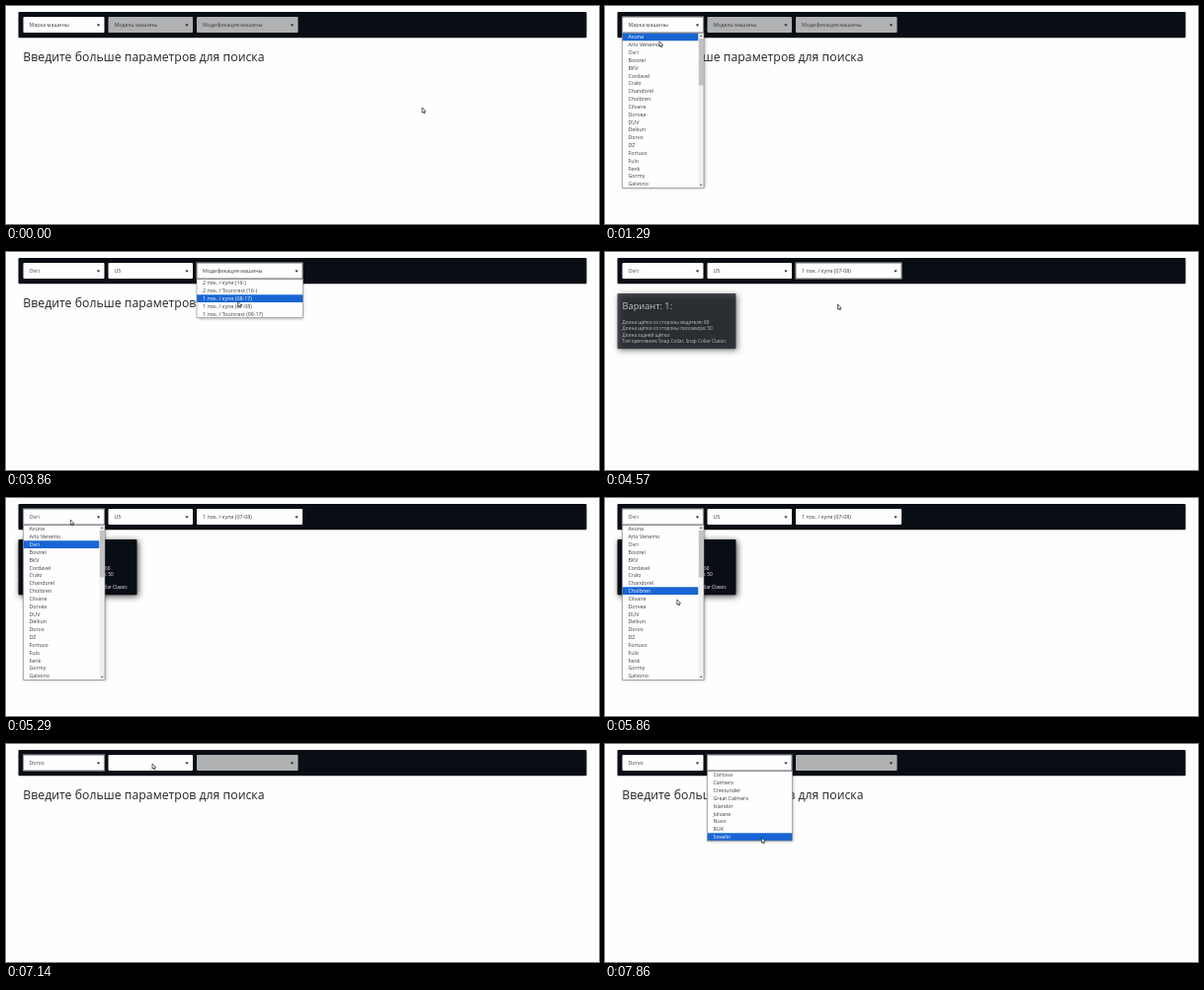
An HTML page with a canvas for the animation above (8 s loop, 600 px wide and 221 px high).

```html
<!DOCTYPE html>
<html lang="ru">
<head>
<meta charset="utf-8">
<title>Подбор щёток</title>
<style>
html, body { margin: 0; width: 100%; height: 100%; overflow: hidden; background: #fefefe; }
canvas { display: block; width: 600px; height: 221px; }
</style>
</head>
<body>
<canvas id="stage"></canvas>
<script>
const W = 600, H = 221, LOOP = 8000, FPS = 7;
const TOP = 27.5, ROW = 7.84, LAG = 45;
const DARK = '#090d14', INK = '#3a3b3e';

const canvas = document.getElementById('stage');
const ctx = canvas.getContext('2d');
const dpr = window.devicePixelRatio || 1;
canvas.width = W * dpr;
canvas.height = H * dpr;

const brands = ['Avuna', 'Arlo Venemo', 'Ovri', 'Bostrel', 'BKV', 'Cordavel', 'Cralo',
  'Chandorel', 'Cholbren', 'Cilvane', 'Dorvea', 'DUV', 'Delkun', 'Dorvo', 'DZ',
  'Fortuvo', 'Fulo', 'Fenk', 'Gormy', 'Galvono'];
const ovriModels = ['110', '70', 'U1', 'U3', 'U4', 'U5', 'U6', 'U7', 'U8',
  'W2', 'W3', 'W5', 'W7', 'N8', 'LL'];
const dorvoModels = ['Cortuva', 'Calmero', 'Crestunder', 'Great Calmero', 'Islandor',
  'Jolvane', 'Nuvo', 'RUK', 'Sovelin'];
const versions = ['2 пок. / купе (16-)', '2 пок. / Tourcrest (16-)', '1 пок. / купе (08-17)',
  '1 пок. / купе (07-08)', '1 пок. / Tourcrest (09-17)'];

const cardLines = [
  'Длина щётки со стороны водителя: 60',
  'Длина щётки со стороны пассажира: 50',
  'Длина задней щётки:',
  'Тип крепления: Snap Collar, Snap Collar Classic'
];

// Dropdown sessions: which select, when it opens and closes, what it lists
const menus = [
  { id: 0, from: 950, to: 1650, rows: brands, picked: -1, scroll: true },
  { id: 1, from: 2100, to: 2950, rows: ovriModels, picked: 0 },
  { id: 2, from: 3500, to: 4100, rows: versions, picked: 0 },
  { id: 0, from: 5200, to: 6350, rows: brands, picked: 2, scroll: true },
  { id: 1, from: 7200, to: LOOP, rows: dorvoModels, picked: -1 }
];

// Pointer stops: time, x, y
const stops = [
  [0, 421, 103], [100, 421, 103], [860, 62, 20], [1050, 62, 21], [1480, 50, 47],
  [1650, 50, 47], [2020, 143, 21], [2150, 143, 22], [2640, 153.5, 70], [3010, 153.5, 70],
  [3430, 225, 20], [3600, 225, 20], [3913, 235.5, 53], [4700, 235.5, 53], [5140, 66, 21],
  [5500, 64, 24], [6037, 76, 131], [6650, 76, 131], [7130, 148, 20], [7250, 148, 22],
  [7720, 157, 92], [7860, 158.5, 95], [LOOP, 158.5, 95]
];

const clamp = v => Math.max(0, Math.min(1, v));
const ramp = (t, a, b) => clamp((t - a) / (b - a));
const mix = (a, b, u) => a + (b - a) * u;

function pointerAt(t) {
  let i = 1;
  while (i < stops.length - 1 && t > stops[i][0]) i++;
  const [t0, x0, y0] = stops[i - 1], [t1, x1, y1] = stops[i];
  const u = ramp(t, t0, t1), s = u * u * (3 - 2 * u);
  return { x: mix(x0, x1, s), y: mix(y0, y1, s) };
}

function box(x, y, w, h, color, r = 0) {
  ctx.fillStyle = color;
  ctx.beginPath();
  ctx.roundRect(x, y, w, h, r);
  ctx.fill();
}

// Set large and scaled down so that glyph advances stay fractional
function text(str, x, y, size, color) {
  ctx.save();
  ctx.translate(x, y);
  ctx.scale(0.1, 0.1);
  ctx.font = `${size * 10}px "Open Sans", "Noto Sans", sans-serif`;
  ctx.fillStyle = color;
  ctx.fillText(str, 0, 0);
  ctx.restore();
}

function poly(points, color) {
  ctx.beginPath();
  points.forEach(([x, y]) => ctx.lineTo(x, y));
  ctx.closePath();
  ctx.fillStyle = color;
  ctx.fill();
}

function shadow(color, blur, dx, dy) {
  ctx.shadowColor = color;
  ctx.shadowBlur = blur * dpr;
  ctx.shadowOffsetX = dx * dpr;
  ctx.shadowOffsetY = dy * dpr;
}

function selects(t) {
  const reset = t >= 6350;
  const modelOn = t >= 1650, versionOn = t >= 2950 && !reset;
  return [
    { x: 17.5, w: 82, on: true, label: reset ? 'Dorvo' : modelOn ? 'Ovri' : 'Марка машины' },
    { x: 103.5, w: 85.5, on: modelOn, label: reset ? '' : versionOn ? 'U5' : 'Модель машины' },
    { x: 193, w: versionOn ? 107 : 102.5, on: versionOn,
      label: reset ? '' : t >= 4100 ? versions[3] : 'Модификация машины' }
  ];
}

function drawSelect(s, focused) {
  box(s.x, 11, s.w, 16, s.on ? '#fefefe' : '#b0b1b2', 1);
  if (focused) {
    ctx.strokeStyle = '#8b8c8e';
    ctx.lineWidth = 1.2;
    ctx.strokeRect(s.x, 11, s.w, 16);
  }
  text(s.label, s.x + 6, 21.4, 5.3, INK);
  const ax = s.x + s.w - 6;
  poly([[ax - 1.7, 18.6], [ax + 1.7, 18.6], [ax, 20.7]], '#222');
}

function drawMenu(menu, s, t) {
  const h = menu.rows.length * ROW, w = s.w + 0.5;
  ctx.save();
  shadow('rgba(0,0,0,.4)', 3, 0.5, 1);
  box(s.x, TOP, w, h, '#fefefe');
  ctx.restore();

  const y = pointerAt(t - LAG).y;
  const hot = y > TOP ? Math.floor((y - TOP) / ROW) : menu.picked;
  const inner = menu.scroll ? w - 5.5 : w;
  menu.rows.forEach((name, i) => {
    const top = TOP + i * ROW;
    if (i === hot) box(s.x, top, inner, ROW, '#1965d4');
    text(name, s.x + 6, top + 5.8, 5.3, i === hot ? '#fff' : INK);
  });

  if (menu.scroll) {
    const sx = s.x + inner, mid = sx + 2.7, end = TOP + h;
    box(sx, TOP, 5.5, h, '#f0f0f0');
    box(sx + 0.4, TOP + 5.5, 4.6, 47.5, '#c2c2c2');
    poly([[mid - 1.3, 31], [mid + 1.3, 31], [mid, 29.2]], '#555');
    poly([[mid - 1.3, end - 3.6], [mid + 1.3, end - 3.6], [mid, end - 1.8]], '#555');
  }
  ctx.strokeStyle = '#85868a';
  ctx.lineWidth = 0.6;
  ctx.strokeRect(s.x, TOP, w, h);
}

function drawCard(alpha) {
  if (alpha <= 0) return;
  ctx.save();
  ctx.globalAlpha = alpha;
  ctx.save();
  shadow('rgba(0,0,0,.7)', 6, 1.5, 1.5);
  box(12.5, 42, 120, 56.3, DARK, 1);
  ctx.restore();
  text('Вариант: 1:', 17.5, 58, 9.25, '#fff');
  cardLines.forEach((line, i) => text(line, 17.5, 72.6 + i * 6.53, 4.72, '#fff'));
  ctx.restore();
}

function drawHeading(alpha) {
  ctx.save();
  ctx.globalAlpha = alpha;
  text('Введите больше параметров для поиска', 17.3, 56.2, 12.3, '#212529');
  ctx.restore();
}

function drawPointer({ x, y }) {
  ctx.save();
  ctx.translate(x, y);
  ctx.beginPath();
  [[0, 0], [0, 5.2], [1.2, 4.2], [2, 6], [2.9, 5.6], [2.1, 3.9], [3.7, 3.8]]
    .forEach(([px, py]) => ctx.lineTo(px, py));
  ctx.closePath();
  ctx.fillStyle = '#fff';
  ctx.fill();
  ctx.strokeStyle = '#111';
  ctx.lineWidth = 0.65;
  ctx.stroke();
  ctx.restore();
}

function draw(t) {
  ctx.setTransform(dpr, 0, 0, dpr, 0, 0);
  box(0, 0, W, H, '#fefefe');
  box(12.5, 6, 575, 26.3, DARK, 1);

  drawCard(ramp(t, 4250, 4700) * (1 - ramp(t, 6350, 6650)));
  drawHeading(t < 5000 ? 1 - ramp(t, 4100, 4400) : ramp(t, 6350, 6770));

  const fields = selects(t);
  const last = menus.filter(m => t >= m.from).pop();
  fields.forEach((s, i) => drawSelect(s, last && last.id === i));
  if (last && t < last.to) drawMenu(last, fields[last.id], t);
  drawPointer(pointerAt(t));
}

const start = performance.now();
function tick() {
  const t = (performance.now() - start) % LOOP;
  draw(Math.floor((t + 5) * FPS / 1000) * 1000 / FPS);
  requestAnimationFrame(tick);
}
tick();
</script>
</body>
</html>
```
